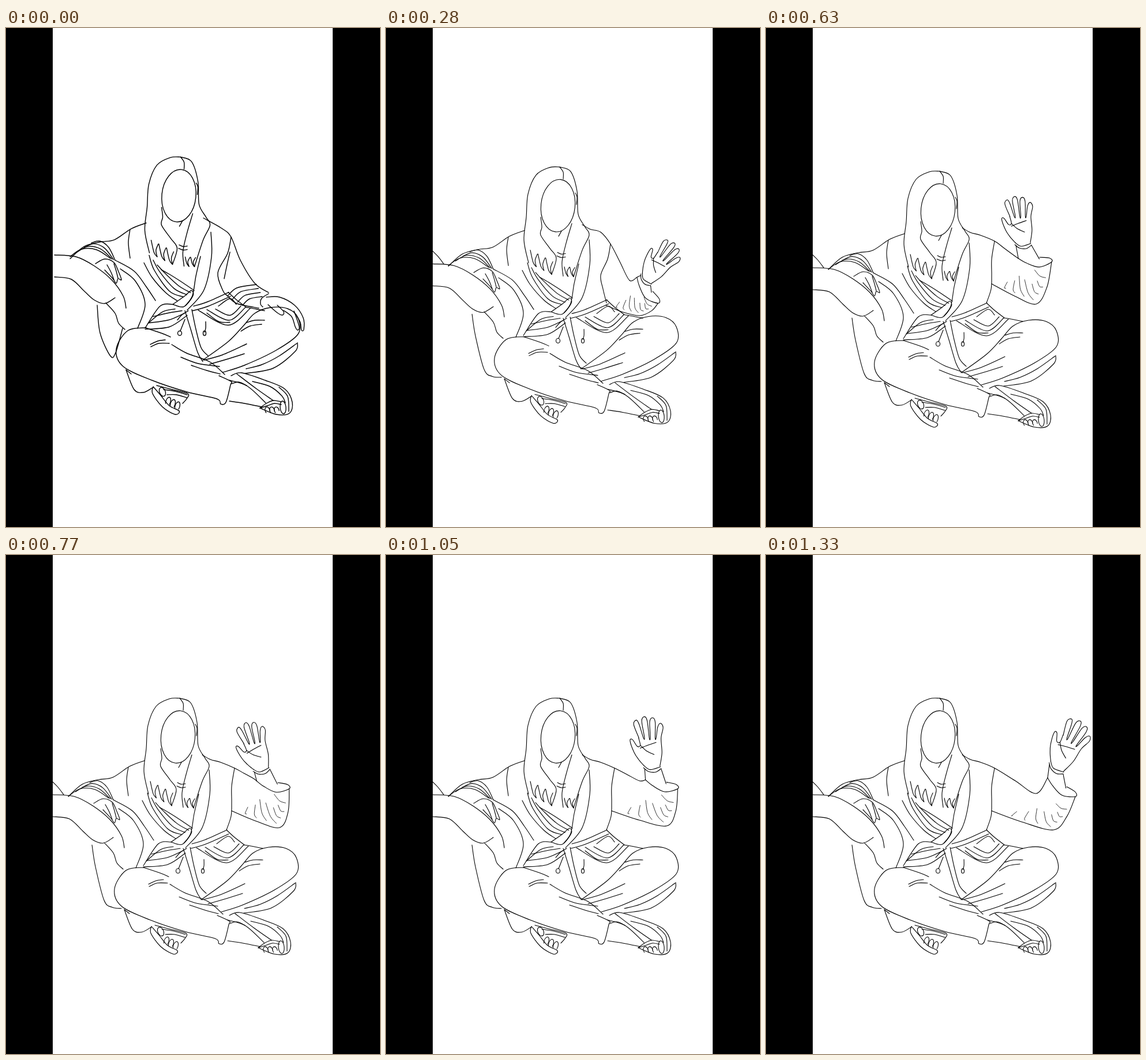
Animation, 648 px wide and 864 px high, one loop 1.4 s. Source, as an HTML page with a canvas:

```html
<!DOCTYPE html>
<html lang="en">
<head>
<meta charset="utf-8">
<title>Waving line drawing</title>
<style>
html, body { margin: 0; width: 100%; height: 100%; overflow: hidden; background: #000; }
canvas { display: block; width: 648px; height: 864px; }
</style>
</head>
<body>
<canvas id="stage" width="648" height="864"></canvas>
<script>
const ctx = document.getElementById('stage').getContext('2d');
const STEP = 70, STEPS = 20;

const mix = (a, b, k) => a + (b - a) * k;
const mixPt = (p, q, k) => p.map((v, i) => mix(v, q[i], k));
const mixLine = (a, b, k) => a.map((p, i) => mixPt(p, b[i], k));
const clamp = v => Math.max(0, Math.min(1, v));

// "x,y x,y / x,y ..." -> strokes, each a list of key points
const parse = s => s.split('/').map(l => l.trim().split(/\s+/).map(p => p.split(',').map(Number)));
// n strokes spread evenly from the first stroke to the second
const spread = (n, s) => {
  const [a, b] = parse(s);
  return Array.from({ length: n }, (_, i) => mixLine(a, b, i / (n - 1)));
};

// smooth line through key points
function curve(pts, fill) {
  const at = i => pts[Math.max(0, Math.min(pts.length - 1, i))];
  ctx.beginPath();
  ctx.moveTo(...pts[0]);
  for (let i = 0; i < pts.length - 1; i++) {
    const [p, a, b, n] = [at(i - 1), at(i), at(i + 1), at(i + 2)];
    ctx.bezierCurveTo(a[0] + (b[0] - p[0]) / 6, a[1] + (b[1] - p[1]) / 6,
      b[0] - (n[0] - a[0]) / 6, b[1] - (n[1] - a[1]) / 6, ...b);
  }
  if (fill) ctx.fill();
  ctx.stroke();
}
const curves = strokes => strokes.forEach(s => curve(s));

function oval(x, y, rx, ry, turn = 0, from = 0, to = 7) {
  ctx.beginPath();
  ctx.ellipse(x, y, rx, ry, turn, from, Math.min(to, from + 2 * Math.PI));
  ctx.stroke();
}

function shifted(x, y, paint) {
  ctx.save();
  ctx.translate(x, y);
  paint();
  ctx.restore();
}

// pointed ends of the hair between two corners
function locks(a, b, n, rise) {
  for (let i = 0; i < n; i++) {
    const l = mixPt(a, b, i / n), r = mixPt(a, b, (i + 1) / n);
    curve([[l[0] + 3, l[1] - rise], [mix(l[0], r[0], .6), r[1] - rise / 3], r]);
    curve([r, [r[0] - 2, r[1] - rise * .5], [r[0] + 2, r[1] - rise]]);
  }
}

const hair = parse(`301,248 283,249 260,262 246,295 243,335 239,375 247,414 / 301,248 307,257 307,269
/ 268,335 270,352 268,366 284,389 295,406 287,434 / 301,248 320,256 331,290 333,330 345,352 352,366 340,392 325,438
/ 322,346 312,380 305,412 307,437 / 328,293 331,300 330,313 / 304,359 299,368`);
const collar = [
  ...spread(2, '297,394 304,397 311,396 / 296,400 304,403 311,402'),
  ...spread(4, '245,412 254,438 280,474 304,484 / 266,437 282,446 304,460 323,473')
];
const coat = parse(`240,356 214,366 185,385 160,389 132,397 108,418 / 212,367 209,390 212,417
/ 236,425 250,450 274,477 294,491 / 352,372 353,415 340,472 311,507 / 334,414 326,448 320,482 308,499`);
const belt = [
  ...parse('286,497 306,483 318,473 321,482 305,501 286,497 / 294,524 302,515 313,508 / 345,512 366,527 385,528'),
  ...spread(2, '322,500 345,493 383,476 / 320,508 345,501 386,483'),
  ...spread(2, '286,497 264,500 238,538 / 290,505 268,510 243,530'),
  ...spread(3, '252,518 278,512 302,508 / 238,540 280,536 311,516'),
  ...spread(2, '307,508 317,540 329,580 338,596 / 319,506 326,540 335,572 347,586')
];
const skirt = [
  ...spread(3, '360,505 385,516 404,500 / 330,507 382,533 420,504'),
  ...spread(2, '365,500 385,487 396,497 / 382,476 395,488 413,502'),
  ...parse('413,502 430,505 445,508 / 307,523 303,533 299,543 / 343,527 343,538 341,545')
];
const restingArm = [
  ...spread(4, '108,418 128,405 154,406 178,421 / 145,394 160,391 175,402 186,424'),
  ...parse(`152,430 168,422 184,428 192,444 197,458 191,456 188,464 182,456 168,441
  / 172,432 179,445 184,458 / 184,430 188,443 191,455 / 186,424 219,443 240,470 256,494`)
];
const couch = parse(`81,415 118,418 150,434 180,458 200,486 205,507 / 81,453 110,457 133,478 150,493 168,499 186,489
/ 170,498 186,516 192,533 203,544 / 195,439 221,460 238,500 225,542 / 205,614 219,648 235,653 252,644 / 205,614 214,621`);
const [hang, swing] = parse('149,502 155,540 170,598 184,610 200,612 / 155,502 160,550 178,590 187,584 199,542');
const flap = parse('81,393 90,402 100,415')[0];
const legs = [
  ...parse(`240,541 208,546 188,578 200,608 250,632 310,652 362,664 369,673 378,670 386,640 387,634 366,624
  / 238,541 268,551 282,557 / 284,570 310,585 350,600 376,622
  / 338,597 382,565 408,538 428,516 455,506 485,508 503,524 503,552 465,580 410,606 373,618
  / 404,547 420,538 440,535 / 414,532 428,528 445,528`),
  ...spread(2, '248,574 262,568 280,568 / 247,570 260,564 273,562'),
  ...spread(2, '300,592 330,603 367,608 / 318,606 345,615 368,621'),
  ...spread(2, '340,597 372,588 414,569 / 350,604 378,596 410,586'),
  ...spread(2, '502,567 498,582 460,611 412,620 / 501,568 470,590 440,605 413,612')
];
const feet = [
  ...parse(`387,624 405,619 446,632 480,647 493,670 488,689 465,691 437,680 / 384,668 410,672 440,678 / 388,638 400,635 414,641
  / 424,634 455,643 475,659 481,671 / 470,644 485,660 487,686 / 252,643 251,655 268,678 290,691 297,685 280,676 265,658 252,643
  / 258,641 285,648 312,655 310,664 303,672`),
  ...spread(2, '397,621 430,646 460,667 / 384,632 415,642 447,671'),
  ...spread(2, '437,680 448,672 460,667 473,669 / 437,680 450,676 462,672 474,674'),
  ...spread(2, '270,648 290,651 311,657 / 276,657 292,657 310,662')
];

// arm at rest on the knee
const rest = [
  ...parse(`342,329 374,347 390,362 406,402 431,442 455,458 / 390,362 384,390 367,424 376,455 384,464 400,477 438,485
  / 388,388 383,410 378,434 / 455,460 443,468 441,478 445,483 / 451,466 474,466 500,480 515,502 516,522 512,523 510,510 504,499
  / 454,479 470,493 479,497 481,491 470,480 / 481,489 495,500 501,517 505,523 508,517 499,490`),
  ...spread(4, '384,464 400,450 434,444 / 410,480 422,469 444,465')
];

// key poses of the waving arm
const poses = [
  { step: 2, wrist: [445, 454], turn: 71, cuff: [444, 472], tilt: 52, elbow: [440, 497], crook: [421, 444] },
  { step: 4, wrist: [452, 436], turn: 48, cuff: [453, 454], tilt: 51, elbow: [440, 498], crook: [422, 437] },
  { step: 9, wrist: [447, 374], turn: 0, cuff: [466, 402], tilt: 6, elbow: [468, 478], crook: [430, 394] },
  { step: 13, wrist: [441, 368], turn: -17, cuff: [459, 394], tilt: 21, elbow: [480, 466], crook: [426, 379] },
  { step: 17, wrist: [485, 367], turn: 19, cuff: [496, 400], tilt: 10, elbow: [493, 472], crook: [452, 403] },
  { step: 19, wrist: [505, 369], turn: 37, cuff: [512, 402], tilt: 34, elbow: [498, 476], crook: [468, 413] }
];

function poseAt(step) {
  let i = 0;
  while (i < poses.length - 2 && poses[i + 1].step <= step) i++;
  const a = poses[i], b = poses[i + 1], k = (step - a.step) / (b.step - a.step);
  return Object.fromEntries(Object.keys(a).map(n =>
    [n, Array.isArray(a[n]) ? mixPt(a[n], b[n], k) : mix(a[n], b[n], k)]));
}

// maps local points to a turned and scaled place
const placer = ([x, y], deg, sx, sy) => {
  const c = Math.cos(deg * Math.PI / 180), s = Math.sin(deg * Math.PI / 180);
  return ([u, v]) => [x + u * sx * c - v * sy * s, y + u * sx * s + v * sy * c];
};

const thumb = parse('-15,-2 -24,-12 -32,-24 -39,-43 -35,-45 -27,-34 -22,-36 -25,-48')[0];
const creases = parse('-22,-36 -12,-27 1,-21 / -22,-31 -10,-36 4,-41 / -16,1 -8,7 4,8 13,2 / -15,-2 -5,4 12,-1');

function openHand(place) {
  const outline = [...thumb];
  for (let i = 0; i < 4; i++) {
    const base = -21 + 9.7 * i, x = -29 + 13.2 * i, y = -83.5 + 3.7 * (i - 1.3) ** 2;
    outline.push([base - 4, -49], [x - 4.5, y + 7], [x, y], [x + 4.5, y + 7], [base + 4, -48]);
  }
  outline.push([14, -24], [11, -2]);
  curve(outline.map(place), true);
  creases.forEach(s => curve(s.map(place)));
}

function wavingArm(step, x, y) {
  const { wrist, turn, cuff, tilt, elbow, crook } = poseAt(step);
  const lifted = clamp((step - 4) / 5);
  const shoulder = mixPt([389, 374], [396, 369], lifted), pit = mixPt([381, 480], [391, 443], lifted);
  const rim = placer(cuff, tilt, 29, 29);
  const near = rim([-1, 0]), far = rim([1, 0]);
  const size = mix(.94, 1.07, clamp((step - 4) / 13));
  const hand = placer(wrist, turn, size * mix(1, .75, clamp((turn - 45) / 25)), size);

  curve([[340 + x, 346 + y], [354 + x, 354 + y], [372 + x, 359 + y], shoulder, mixPt(shoulder, crook, .5), crook, near]);
  const bend = mixPt(far, elbow, .6), middle = mixPt(elbow, pit, .5);
  const under = [far, [bend[0] + 8, bend[1]], elbow, [middle[0], middle[1] + 3], pit];
  curve(under);
  curve([shoulder, [shoulder[0] - 5, 400], [mix(372, 391, lifted), 428], [mix(376, 390, lifted), 452], [382, 476]]);

  curve([near, rim([-.5, .22]), rim([.3, .38]), far, rim([.85, -.22]), rim([.25, -.2])], true);
  curve([hand([-14, 3]), near]);
  curve([hand([13, 2]), rim([.25, -.1])]);
  openHand(hand);

  // creases fan from the underside towards the crook
  ctx.lineWidth = .8;
  for (let i = 0; i < 7; i++) {
    const u = .7 + i * .45, j = Math.floor(u);
    const root = mixPt(under[j], under[j + 1], u - j);
    const reach = .4 + .15 * Math.sin(i * 5);
    const mid = mixPt(root, crook, reach / 2);
    curve([mixPt(root, crook, .08), [mid[0] - 3, mid[1] + 2], mixPt(root, crook, reach)]);
  }
}

function draw(step) {
  // the body drops quickly, then settles
  const jolt = .3 ** step;
  const lift = step < 8 ? 13 * (1 - step / 8) + 9 * jolt : 0;
  const lean = 3 * jolt;

  ctx.fillStyle = '#fff';
  ctx.fillRect(81, 0, 485, 864);
  ctx.strokeStyle = '#000';
  ctx.lineCap = ctx.lineJoin = 'round';
  ctx.lineWidth = 1.1 + .3 * jolt;

  shifted(lean, -lift, () => {
    [couch, restingArm, legs, feet].forEach(curves);
    curve(mixLine(hang, swing, jolt));
    if (step) curve(flap);
    for (let i = 0; i < 3; i++) {
      oval(450 + 8 * i, 684, 4, 6, -.3, 2.6, 6.6);
      oval(278 + 8 * i, 669 + 4 * i, 4, 8, .3, 2.6, 6.8);
    }
    oval(477, 679, 5, 11, -.1);
    oval(268, 652, 5, 8, -.4);
  });
  shifted(lean, -lift * .84, () => {
    [coat, collar, belt, skirt].forEach(curves);
    oval(298, 547, 3.5, 4);
    oval(341, 547, 2.5, 4);
  });
  shifted(lean / 2, -lift * 1.12, () => {
    curves(hair);
    oval(298, 315, 29.5, 45.5, .1);
    locks([247, 414], [287, 434], 3, 22);
    locks([306, 437], [325, 438], 2, 16);
  });
  if (step) wavingArm(step, lean, -lift * .84);
  else curves(rest);

  ctx.fillStyle = '#000';
  ctx.fillRect(0, 0, 81, 864);
  ctx.fillRect(566, 0, 82, 864);
}

const start = performance.now();
function tick() {
  draw(Math.floor((performance.now() - start) / STEP) % STEPS);
  requestAnimationFrame(tick);
}
tick();
</script>
</body>
</html>
```
